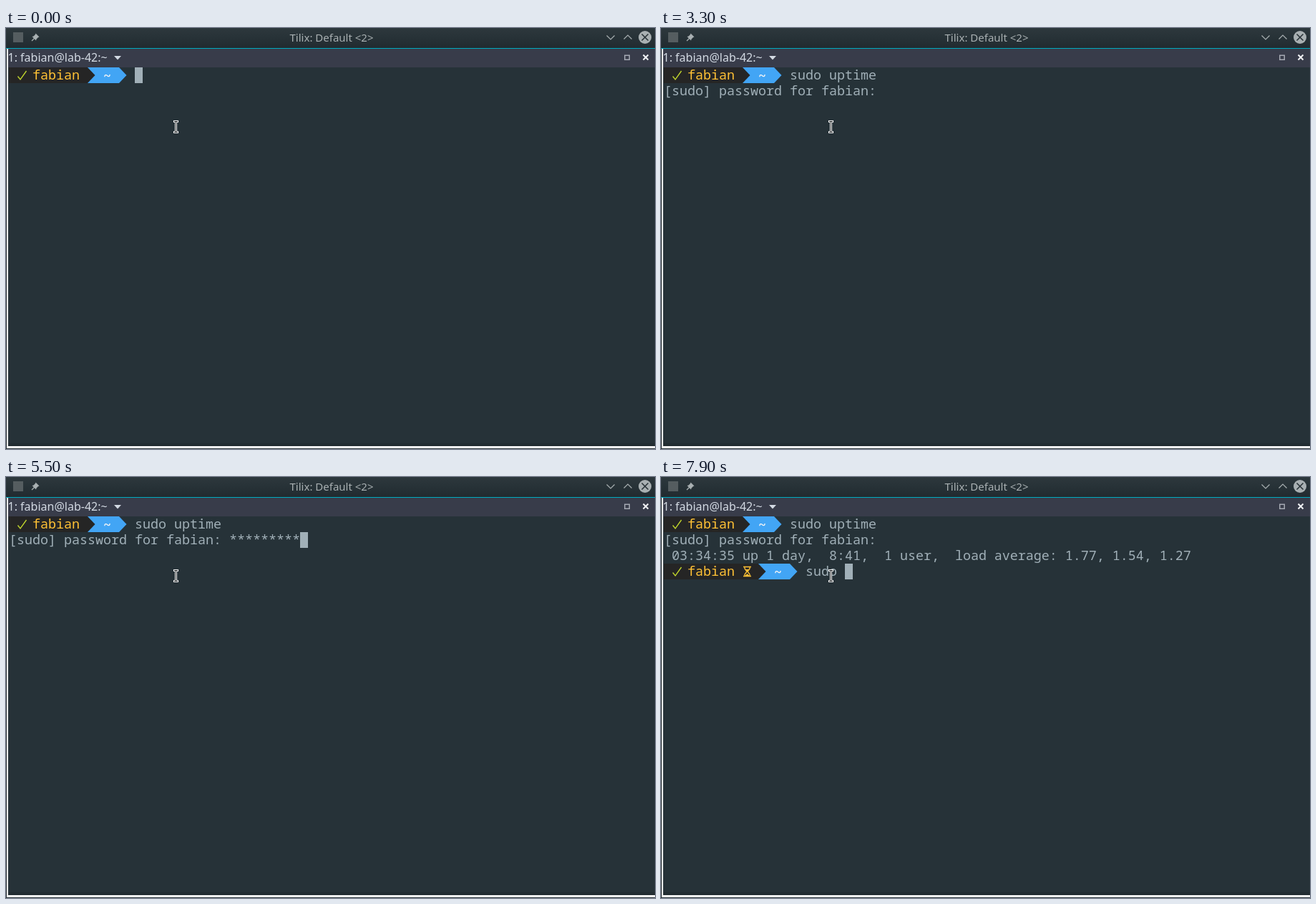
Animation, 907 px wide and 588 px high, one loop 8 s. Source, as an HTML page:

```html
<!DOCTYPE html>
<html lang="en">
<head>
<meta charset="utf-8">
<title>Terminal session</title>
<style>
  html, body { margin: 0; width: 100%; height: 100%; overflow: hidden; background: #263238; }
  svg { display: block; width: 100%; height: 100%; }
  text { white-space: pre; }
  .ui { font: 15px "Noto Sans", sans-serif; }
  .ui.tab { font-size: 16px; }
  .mono { font: 18.333px "Noto Sans Mono", monospace; fill: #a1b0b8; font-variant-ligatures: none; }
  .mono.name { fill: #ffc135; }
  .mono.path { fill: #f5f5f5; font-weight: 700; }
  .line { fill: none; }
</style>
</head>
<body>
<svg id="stage" viewBox="0 0 907 588">
  <defs>
    <linearGradient id="bar" x2="0" y2="1">
      <stop offset="0" stop-color="#2d383d"/>
      <stop offset="1" stop-color="#212b30"/>
    </linearGradient>
  </defs>
  <rect width="907" height="588" fill="#263238"/>

  <!-- title bar -->
  <rect width="907" height="28" fill="url(#bar)"/>
  <rect x="10" y="6" width="14" height="14" fill="#555d60"/>
  <g fill="#a9b0b2">
    <path d="M41.5 7.5 46.5 12.5 45 13 42.5 15.5 42 17.5 36.5 12 38.5 11.5 41 9Z"/>
    <path class="line" d="M40 14 36 18" stroke="#a9b0b2" stroke-width="1.2"/>
    <text class="ui" x="455" y="19" text-anchor="middle">Tilix: Default &lt;2&gt;</text>
    <circle cx="893" cy="13" r="9"/>
  </g>
  <g class="line" stroke="#a9b0b2" stroke-width="1.2">
    <path d="M839.5 10.5 845 16 850.5 10.5"/>
    <path d="M863.5 15.5 869 10 874.5 15.5"/>
    <path d="M888.5 8.5 897.5 17.5M897.5 8.5 888.5 17.5" stroke="#263035" stroke-width="1.5"/>
  </g>
  <rect y="28" width="907" height="1" fill="#00acc1"/>

  <!-- pane header -->
  <rect y="29" width="907" height="26" fill="#383c4a"/>
  <text class="ui tab" x="2.5" y="47" fill="#d3dae3">1: fabian@lab-42:~</text>
  <path d="M151 39H161L156 44.5Z" fill="#d3dae3"/>
  <rect class="line" x="864.75" y="38.25" width="6.5" height="6" stroke="#a4a8b2" stroke-width="1.5"/>
  <path class="line" d="M890.5 37.5 897.5 44.5M897.5 37.5 890.5 44.5" stroke="#f2f4f6" stroke-width="2"/>

  <!-- pane edges -->
  <rect y="580" width="907" height="4" fill="#222d32"/>
  <rect y="29" width="1" height="559" fill="#20292e"/>
  <path d="M1 29H3V584H907V587H1Z" fill="#fff"/>

  <g id="screen"></g>
  <rect id="cursor" width="11" height="22" fill="#a1b0b8"/>

  <!-- mouse pointer -->
  <g class="line" stroke-linecap="square">
    <path d="M235.5 130.5H239.5M237.5 130.5V145.5M235.5 145.5H239.5" stroke="#fff" stroke-width="3"/>
    <path d="M235.5 130.5H239.5M237.5 130.5V145.5M235.5 145.5H239.5" stroke="#1b1f21" stroke-width="1"/>
  </g>
</svg>
<script>
const LOOP = 8000, CELL_W = 11, CELL_H = 22, USER = "fabian";
const screen = document.getElementById("screen");
const cursor = document.getElementById("cursor");

const colX = col => 4 + col * CELL_W;
const rowY = row => 55 + row * CELL_H;

function add(tag, attrs, text = "", parent = screen) {
  const node = document.createElementNS("http://www.w3.org/2000/svg", tag);
  for (const key in attrs) node.setAttribute(key, attrs[key]);
  node.textContent = text;
  return parent.appendChild(node);
}

const write = (col, row, text = "", kind = "", parent = screen) =>
  add("text", { class: "mono " + kind, x: colX(col), y: rowY(row) + 17 }, text, parent);

function addPrompt(row, slow) {
  const group = add("g", {});
  const y = rowY(row), end = slow ? 12 : 10, left = colX(end);
  const shape = (d, fill) => add("path", { d, fill }, "", group);
  const stroke = (d, color) =>
    add("path", { d, fill: "none", stroke: color, "stroke-width": 1.3 }, "", group);

  shape(`M${left} ${y}h44l10.5 11-10.5 11h-44z`, "#42a5f5");
  shape(`M4 ${y}H${left}l10.5 11-10.5 11H4z`, "#252525");
  stroke(`M16.5 ${y + 12.5}l3.5 4.5 8.5-12`, "#c3d82c");
  write(3, row, USER, "name", group);
  write(end + 2, row, "~", "path", group).setAttribute("dy", 1);
  if (slow) {
    stroke(`M115 ${y + 4.5}h11M115 ${y + 17.5}h11M117 ${y + 5}v2l3 4-3 4v2M124 ${y + 5}v2l-3 4 3 4v2`, "#ffc135");
    shape(`M118 ${y + 8}h5l-2.5 3zM117.5 ${y + 17}l3-3 3 3z`, "#ffc135");
  }
  return group;
}

addPrompt(0, false);
const secondPrompt = addPrompt(3, true);
const firstInput = write(16, 0);
const passwordLine = write(0, 1);
const output = write(0, 2, " 03:34:35 up 1 day,  8:41,  1 user,  load average: 1.77, 1.54, 1.27");
const secondInput = write(18, 3);

const question = `[sudo] password for ${USER}: `;
const firstKeys = [500, 600, 800, 1000, 1300, 1500, 1600, 2100, 2300, 2400, 2600];
const starKeys = [3800, 4000, 4100, 4500, 4700, 5100, 5300, 5400, 5500, 5800];
const secondKeys = [7400, 7500, 7600, 7700, 7900];
const blinks = [[100, 500], [3300, 3700], [6600, 7200]];
const ASKED = 2700, DONE = 6000, READY = 6200;

const typed = (keys, t) => keys.filter(at => at <= t).length;
const show = (node, on) => node.setAttribute("visibility", on ? "visible" : "hidden");

function cursorCell(t) {
  if (t < ASKED) return [16 + typed(firstKeys, t), 0];
  if (t < DONE) return [question.length + typed(starKeys, t), 1];
  if (t < READY) return [0, 3];
  return [18 + typed(secondKeys, t), 3];
}

function draw(t) {
  firstInput.textContent = "sudo uptime".slice(0, typed(firstKeys, t));
  const stars = t < DONE ? "*".repeat(typed(starKeys, t)) : "";
  passwordLine.textContent = t < ASKED ? "" : question + stars;
  secondInput.textContent = "sudo ".slice(0, typed(secondKeys, t));
  show(output, t >= DONE);
  show(secondPrompt, t >= READY);

  const [col, row] = cursorCell(t);
  cursor.setAttribute("x", colX(col));
  cursor.setAttribute("y", rowY(row));
  show(cursor, !blinks.some(([from, to]) => t >= from && t < to));
}

const start = performance.now();
function tick() {
  draw((performance.now() - start) % LOOP);
  requestAnimationFrame(tick);
}
tick();
</script>
</body>
</html>
```
